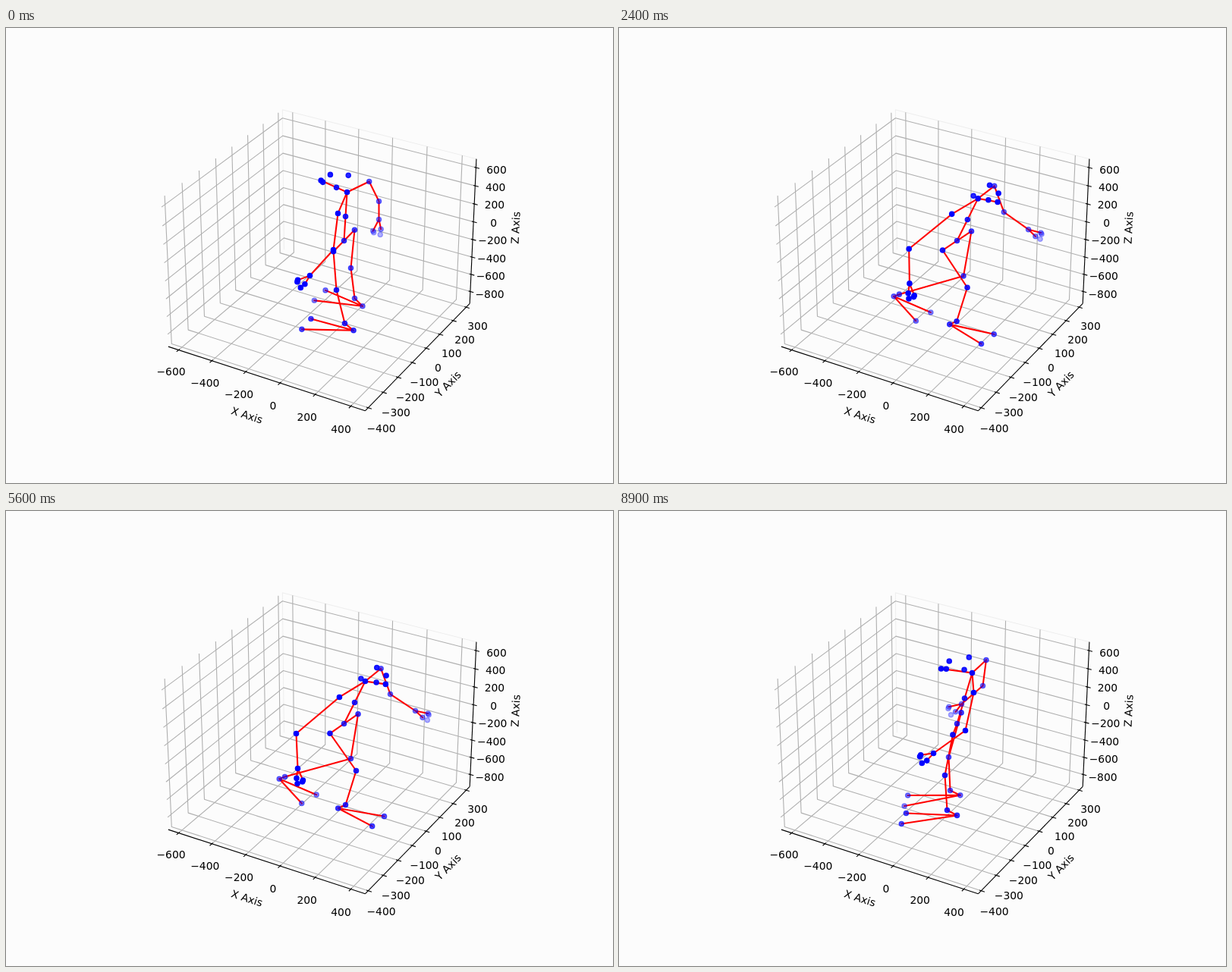
Recreate the animation shown at these times as an HTML page. Size 800 by 600 pixels, loop 9 s.

```html
<!DOCTYPE html>
<html lang="en">
<head>
<meta charset="utf-8">
<title>Skeleton motion plot</title>
<style>
  html, body { margin: 0; width: 100%; height: 100%; overflow: hidden; background: #fcfcfc; }
  svg { display: block; width: 800px; height: 600px; }
  text { font: 13.89px "DejaVu Sans", sans-serif; text-anchor: middle; }
  path { fill: none; }
  .pane { stroke: #eee; }
  .grid { stroke: #b0b0b0; stroke-width: 1.11; stroke-linejoin: round; }
  .axis { stroke: #000; stroke-width: 1.11; }
  .bone { stroke: #f00; stroke-width: 2.08; stroke-linecap: square; }
  circle { fill: #00f; stroke: #00f; stroke-width: 1.39; }
</style>
</head>
<body>
<svg id="stage" viewBox="0 0 800 600"></svg>
<script>
const stage = document.getElementById("stage");

function add(tag, attrs, text) {
  const el = document.createElementNS("http://www.w3.org/2000/svg", tag);
  for (const key in attrs) el.setAttribute(key, attrs[key]);
  if (text) el.textContent = text;
  return stage.appendChild(el);
}

const lerp = (a, b, f) => a + (b - a) * f;
const clamp = (v, lo, hi) => Math.min(hi, Math.max(lo, v));
const rad = deg => deg * Math.PI / 180;

// Camera: azimuth -60, elevation 30, distance 10, box centred on zero.
const W = 0.5952, H = 0.4464;
function project([x, y, z]) {
  const u = 0.866 * x + 0.5 * y;
  const v = -0.25 * x + 0.433 * y + 0.866 * z;
  const depth = 10 - (0.433 * x - 0.75 * y + 0.5 * z);
  return [416.2 + 2497 * u / depth, 296.8 - 2497 * v / depth];
}
const trace = pts => "M" + pts.map(p => project(p).map(n => n.toFixed(2)).join()).join("L");
const line = (cls, ...pts) => add("path", { class: cls, d: trace(pts) });

const axes = [
  { name: "X Axis", from: -600, to: 400, step: 200, mid: -92, unit: 0.001042,
    grid: s => [[s, -W, -H], [s, W, -H], [s, W, H]],
    tick: s => [[s, -W + 0.01, -H], [s, -W - 0.02, -H]],
    edge: [[-W, -W, -H], [W, -W, -H]],
    first: [217, 452], last: [441, 528], bow: 0, title: [317, 510, 18] },
  { name: "Y Axis", from: -400, to: 300, step: 100, mid: -46, unit: 0.001592,
    grid: s => [[W, s, -H], [-W, s, -H], [-W, s, H]],
    tick: s => [[W - 0.01, s, -H], [W + 0.02, s, -H]],
    edge: [[W, -W, -H], [W, W, -H]],
    first: [494, 527], last: [621, 392], bow: 10, title: [582, 469, -45.5] },
  { name: "Z Axis", from: -800, to: 600, step: 200, mid: -124, unit: 0.000546,
    grid: s => [[-W, -W, s], [-W, W, s], [W, W, s]],
    tick: s => [[W - 0.01, W, s], [W + 0.02, W, s]],
    edge: [[W, W, -H], [W, W, H]],
    first: [637, 350], last: [646, 186], bow: 0, title: [671, 263, -87.4] }
];

function eachTick(axis, draw) {
  for (let v = axis.from; v <= axis.to; v += axis.step) draw(v, (v - axis.mid) * axis.unit);
}

line("pane", [-W, W, -H], [-W, W, H], [W, W, H]);
for (const a of axes) eachTick(a, (v, s) => line("grid", ...a.grid(s)));
for (const a of axes) {
  line("axis", ...a.edge);
  eachTick(a, (v, s) => {
    const f = (v - a.from) / (a.to - a.from), bend = a.bow * f * (1 - f);
    line("axis", ...a.tick(s));
    add("text", {
      x: lerp(a.first[0], a.last[0], f) + bend + 0.5,
      y: lerp(a.first[1], a.last[1], f) - bend + 5.5
    }, String(v).replace("-", "\u2212"));
  });
  const [x, y, turned] = a.title;
  add("text", { transform: `translate(${x + 0.5} ${y + 0.5}) rotate(${turned})`, y: 5 }, a.name);
}

// Moves a screen point by a body offset in millimetres, for a body facing `deg`.
function shift([x, y], deg, ahead, left, up) {
  const c = Math.cos(rad(deg)), s = Math.sin(rad(deg));
  const a = ahead * c - left * s, b = ahead * s + left * c;
  return [x + 0.2257 * a + 0.199 * b, y + 0.065 * a - 0.172 * b - 0.118 * up];
}

const pelvis = [445, 280];
const fan = [[-12, 13], [28, 17], [22, 18.5], [-5, 20]];  // finger angle, length

// A pose holds heading, foot splay, neck, then elbow, wrist (left, right)
// and knee, ankle (left, right). Everything else follows from these.
function skeleton([heading, splay, ...xy]) {
  const [neck, elbowL, wristL, elbowR, wristR, kneeL, ankleL, kneeR, ankleR] =
    Array.from({ length: 9 }, (_, i) => xy.slice(2 * i, 2 * i + 2));
  const near = clamp(-0.37 * Math.sin(rad(heading)) - Math.cos(rad(heading)), -1, 1);
  const facing = clamp(-shift([0, 0], heading, 4, 0, 0)[0], -1, 1);
  const face = (ahead, left, up) => shift(neck, heading, ahead, left, up);

  function arm(side, elbow, wrist) {
    const angle = Math.atan2(wrist[1] - elbow[1], wrist[0] - elbow[0]);
    const tips = fan.map(([deg, r]) => {
      const a = angle + facing * rad(deg);
      return [wrist[0] + r * Math.cos(a), wrist[1] + r * Math.sin(a)];
    });
    return [face(-35, side * 118, -45), elbow, wrist, ...tips];
  }
  function leg(side, knee, ankle) {
    const way = heading + side * splay;
    const heel = shift(ankle, way, -45, 0, -65);
    const toes = [-9, 9].map(d => shift(heel, way + d, 245, 0, 0));
    return [shift(pelvis, heading, 0, side * 80, 0), knee, ankle, heel, ...toes];
  }
  const fade = (points, from, to) => points.map((p, i) =>
    [...p, clamp(lerp(from, to, i / (points.length - 1)), 0.3, 1)]);
  const fadeArm = (side, points) =>
    fade(points, 0.85 + 0.25 * side * near, 0.68 + 0.42 * side * near);
  const fadeLeg = (side, points) =>
    fade(points, 0.8 + 0.1 * side * near, 0.55 + 0.1 * side * near);

  const spine = [(pelvis[0] + neck[0]) / 2, (pelvis[1] + neck[1]) / 2];
  const head = [face(140, 0, 75), face(110, 28, 110), face(110, -28, 110),
    face(25, 45, 110), face(25, -45, 110)];
  return [
    ...fade([pelvis, spine, neck], 0.75, 0.95), ...fade(head, 0.98, 0.85),
    ...fadeArm(1, arm(1, elbowL, wristL)), ...fadeArm(-1, arm(-1, elbowR, wristR)),
    ...fadeLeg(1, leg(1, kneeL, ankleL)), ...fadeLeg(-1, leg(-1, kneeR, ankleR))
  ];
}

const start = [186, 4, 449, 216, 431, 292, 400, 326, 491, 228, 491, 252,
  435, 345, 446, 389, 454, 316, 459, 356];
const front = [272, 24, 458, 229, 503, 280, 501, 326, 403, 229, 372, 262,
  441, 344, 430, 377, 402, 329, 394, 364];
const left = [199, 5, 443, 216, 448, 295, 408, 333, 469, 228, 433, 249,
  443, 351, 457, 400, 416, 316, 419, 357];
const crouch = [333, 6, 473, 239, 484, 241, 478, 259, 405, 288, 418, 344,
  464, 334, 456, 372, 396, 325, 355, 345];
const right = [351, -7, 473, 224, 506, 241, 539, 263, 382, 293, 384, 339,
  454, 326, 367, 350, 461, 342, 447, 387];
const stride = [205, -26, 448, 212, 448, 307, 430, 359, 473, 217, 444, 225,
  393, 334, 378, 383, 430, 324, 480, 389];
const end = [208, -2, 465, 213, 456, 289, 414, 319, 479, 230, 451, 254,
  429, 348, 432, 394, 434, 324, 436, 368];

const mix = (a, b, f) => a.map((n, i) => lerp(n, b[i], f));
// A turn from one side to the other passes the front view.
const turn = (a, b) => mix(mix(a, b, 0.5), front, 0.6);
const reach = mix(right, crouch, 0.15);

const keys = [
  [0, start], [1500, front], [2500, right], [2900, turn(right, left)],
  [3300, left], [4000, turn(left, crouch)], [4700, crouch], [5600, right],
  [6300, turn(right, stride)], [7000, stride], [7500, turn(stride, reach)],
  [8000, reach], [8450, turn(reach, end)], [8900, end]
];

// Smooth curve through the keys.
function poseAt(t) {
  let i = 0;
  while (i < keys.length - 2 && t >= keys[i + 1][0]) i++;
  const [t1, a] = keys[i], [t2, b] = keys[i + 1];
  const [t0, before] = keys[Math.max(i - 1, 0)];
  const [t3, after] = keys[Math.min(i + 2, keys.length - 1)];
  const span = t2 - t1, f = (t - t1) / span, g = 1 - f;
  return a.map((n, k) => {
    const m1 = (b[k] - before[k]) / (t2 - t0) * span;
    const m2 = (after[k] - n) / (t3 - t1) * span;
    return n * (1 + 2 * f) * g * g + m1 * f * g * g + b[k] * f * f * (3 - 2 * f) - m2 * f * f * g;
  });
}

const armBones = s => [[2, s], [s, s + 1], [s + 1, s + 2], [s + 2, s + 3], [s + 2, s + 4]];
const legBones = h => [[0, h], [h, h + 1], [h + 1, h + 2], [h + 2, h + 3], [h + 3, h + 4], [h + 3, h + 5]];
const bones = [[0, 1], [1, 2], [2, 3],
  ...armBones(8), ...armBones(15), ...legBones(22), ...legBones(28)];

const frame = add("path", { class: "bone", transform: "translate(.5 .5)" });
const dots = skeleton(start).map(() => add("circle", { r: 3.1, transform: "translate(.5 .5)" }));

function draw(t) {
  const joints = skeleton(poseAt(t));
  const at = i => joints[i][0].toFixed(2) + " " + joints[i][1].toFixed(2);
  frame.setAttribute("d", bones.map(([a, b]) => `M${at(a)}L${at(b)}`).join(""));
  dots.forEach((dot, i) => {
    const [x, y, alpha] = joints[i];
    dot.setAttribute("cx", x);
    dot.setAttribute("cy", y);
    dot.setAttribute("fill-opacity", alpha);
    dot.setAttribute("stroke-opacity", alpha);
  });
}

const origin = performance.now();
function tick() {
  const t = (performance.now() - origin) % 9000;
  draw(Math.floor(t / 100) * 100);
  requestAnimationFrame(tick);
}
tick();
</script>
</body>
</html>
```
